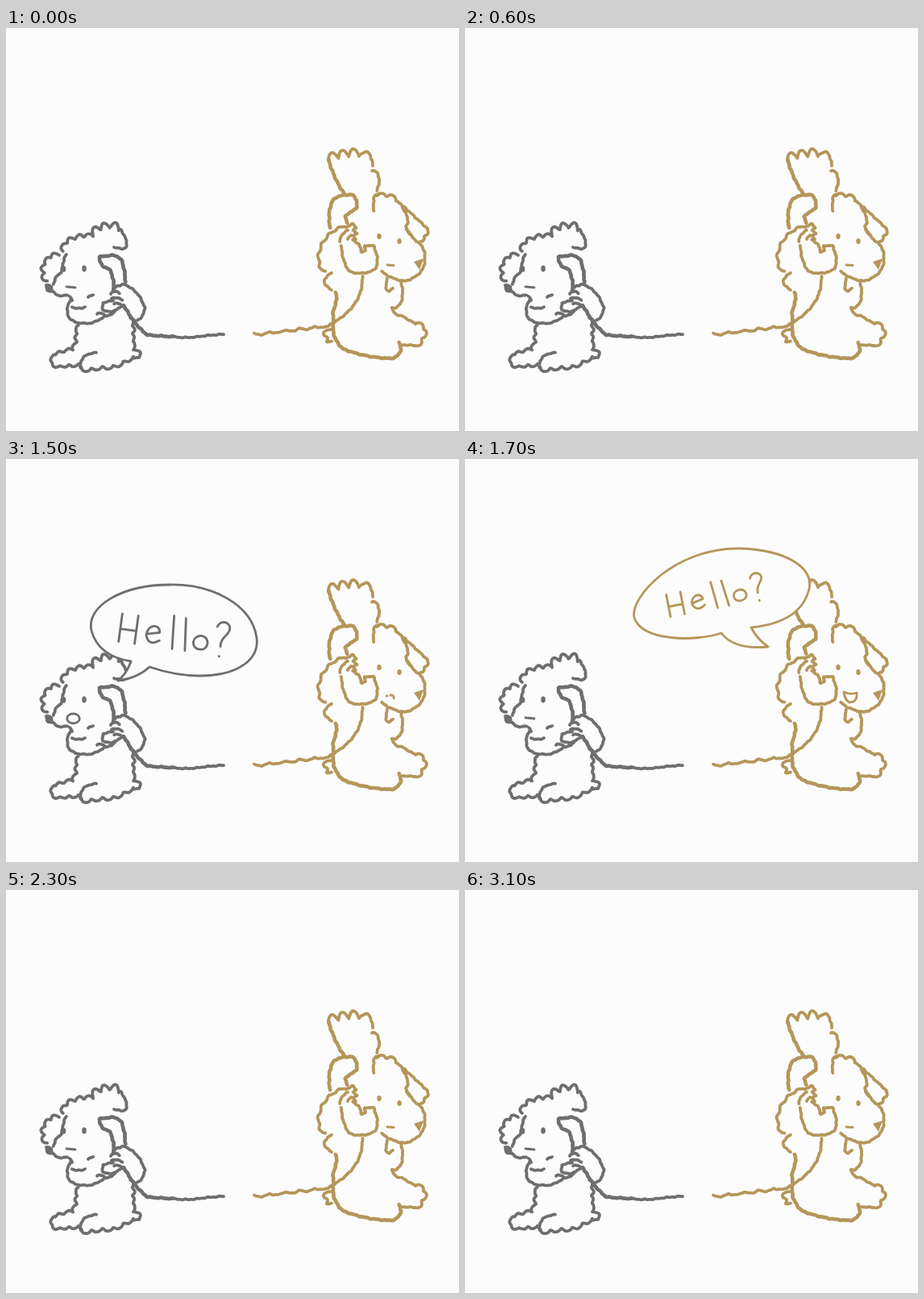
Animation of 562 by 500 pixels, one loop 3.8 s. Source, as an HTML page:

```html
<!DOCTYPE html>
<html lang="en">
<head>
<meta charset="utf-8">
<title>Hello?</title>
<style>
  html, body { margin: 0; width: 100%; height: 100%; overflow: hidden; background: #fcfcfc; }
  svg { display: block; width: 562px; height: 500px; }
  path, ellipse { fill: none; stroke: currentColor; stroke-linecap: round; stroke-linejoin: round; }
  .ink path { stroke-width: 3.8; }
  .ink .bold { stroke-width: 4.6; }
  .bubble path, .mouth, #hello { stroke-width: 2.8; }
  #hello { vector-effect: non-scaling-stroke; }
  .bubble .balloon { fill: #fcfcfc; }
  .solid { fill: currentColor; stroke: none; }
  #gray { color: #6e6e6e; }
  #gold { color: #b5965a; }
</style>
</head>
<body>
<svg viewBox="0 0 562 500">
  <defs>
    <path id="hello" d="M-10-17V18M10-17V18M-10 2H10
      M23 4L39 0C38-12 22-8 23 6Q28 19 40 10
      M54-23L57 18M69-22L73 18
      M91-3C79-2 79 14 91 14S102-3 91-3
      M109-17C112-28 128-24 124-13C122-6 115-4 116 7M116 19V19.5"/>
  </defs>

  <!-- data-bumps adds fur lobes to the left of the drawing direction -->
  <g id="gray">
    <g class="ink">
      <path d="M51 314C44 304 46 284 66 282" data-bumps="4" data-height="4"/>
      <path d="M75 281C68 290 73 302 64 307Q60 311 59 318M58 327Q66 335 76 331M79 333L82 338M102 334L108 331"/>
      <path d="M71 277C72 263 92 259 108 259" data-bumps="4" data-height="4"/>
      <path d="M108 257Q124 245 140 251" data-bumps="3" data-height="8"/>
      <path d="M142 250Q148 257 150 268Q150 277 134 272"/>
      <path class="bold" d="M116 284L130 282Q141 282 144 290Q148 302 148 315M116 284Q117 297 124 297Q133 299 134 324"/>
      <path d="M133 338L120 341V350Q132 355 142 346"/>
      <path d="M133 326Q136 318 141 320Q148 316 152 321Q166 328 172 347Q172 357 163 363M130 330Q136 324 141 329M131 336Q138 332 144 338M134 342Q139 340 144 345"/>
      <path d="M80 337C73 350 74 364 92 366S112 363 121 359M82 346Q90 350 98 346M113 355Q118 352 124 357Q130 358 135 351"/>
      <path d="M82 398C92 392 86 380 90 369" data-bumps="3" data-height="2.5"/>
      <path d="M90 417L62 419Q54 416 60 406L83 399" data-bumps="6" data-height="2.5"/>
      <path d="M158 408C145 412 140 420 125 420S98 426 93 421" data-bumps="5" data-height="3"/>
      <path d="M93 422C90 412 98 403 112 403M158 399Q171 401 165 409H158"/>
      <path d="M154 360C160 372 154 385 159 398" data-bumps="4" data-height="2.5"/>
      <path class="bold" d="M146 344Q162 372 176 381Q190 382 207 383"/>
      <path d="M207 383Q224 385 238 383T270 380"/>
    </g>
    <ellipse class="solid" cx="72" cy="299" rx="2.3" ry="3.7"/>
    <ellipse class="solid" cx="97" cy="298.5" rx="2.8" ry="4"/>
    <path class="solid" d="M48 318Q53 315 58 320L59 328Q51 330 49 325Z"/>
    <path class="mouth closed" d="M75 321L86 322"/>
    <ellipse class="mouth open" cx="83.5" cy="322" rx="7.8" ry="6"/>
    <g class="bubble" role="img" aria-label="Hello?">
      <path class="balloon" d="M155 251Q150 266 139 275Q163 272 178 258C205 267 222 269 240 269C292 269 314 246 311 222C305 180 255 155 203 156C145 156 99 182 106 213C112 235 130 247 155 251Z"/>
      <use href="#hello" transform="translate(152 210) rotate(7.8)"/>
    </g>
  </g>

  <g id="gold">
    <g class="ink">
      <path class="bold" d="M420 206Q408 190 400 163"/>
      <path d="M400 165Q422 158 438 159" data-bumps="3" data-height="9"/>
      <path d="M440 157Q452 146 455 171M454 177C462 176 466 188 460 202M456 227V212Q457 206 462 207"/>
      <path d="M460 208Q476 208 484 213" data-bumps="2" data-height="3"/>
      <path d="M484 214Q491 218 494 227M494 222L523 249M494 227Q502 238 496 246L501 256"/>
      <path d="M523 250L514 265" data-bumps="2" data-height="3"/>
      <path d="M497 250Q505 262 516 270Q523 284 517 299Q510 310 495 314Q478 312 466 302"/>
      <path class="bold" d="M402 248Q398 222 408 211Q418 206 430 207L435 213V224L426 229L421 234L423 242"/>
      <path d="M430 263L438 268L441 278L446 276L445 270H456Q466 294 455 301Q440 307 426 302Q417 290 416 270"/>
      <path d="M422 247L430 243L435 248L430 251L436 255L430 258L434 262M414 265Q416 254 424 251M424 262L428 257"/>
      <path d="M396 302C380 290 392 252 422 247" data-bumps="5" data-height="2"/>
      <path d="M404 304Q386 314 404 325M473 311Q469 324 475 327L480 323M490 314Q496 340 484 347H479"/>
      <path class="bold" d="M409 328Q412 338 406 350V368Q404 385 418 398Q445 409 478 410Q494 406 488 390"/>
      <path d="M479 347Q480 356 491 357L508 367M507 394L492 393M404 374Q392 374 395 382L399 384L398 389H404"/>
      <path d="M508 367Q522 371 518 381T507 394" data-bumps="3" data-height="3"/>
      <path d="M442 308Q444 345 402 368"/>
      <path d="M402 368L308 379" data-bumps="5" data-height="2.5"/>
    </g>
    <ellipse class="solid" cx="463" cy="258.5" rx="2.7" ry="3.5"/>
    <ellipse class="solid" cx="488" cy="264.5" rx="2.7" ry="3.5"/>
    <path class="solid" d="M506 290L518 286L513 300Z"/>
    <path class="mouth closed" d="M473 294L481 294.5"/>
    <path class="mouth hush" d="M472 294H473M477 293Q482 293 481 297"/>
    <path class="mouth open" d="M470 289Q478 293 486 290Q487 302 477 302Q471 299 470 289Z"/>
    <g class="bubble" role="img" aria-label="Hello?">
      <path class="balloon" d="M355 209Q362 223 376 233Q334 237 318 216C285 227 220 226 210 197C204 172 260 110 341 111C400 113 432 135 427 161C420 190 395 205 355 209Z"/>
      <use href="#hello" transform="translate(261 180) rotate(-11) scale(.89 .8)"/>
    </g>
  </g>
</svg>
<script>
// Resamples one stroke with fur lobes and a slight hand wobble.
function sketch(path, d, bumps, height) {
  path.setAttribute('d', d);
  const length = path.getTotalLength();
  const steps = Math.ceil(length / 1.2);
  const points = [];
  for (let i = 0; i <= steps; i++) {
    const s = length * i / steps;
    const p = path.getPointAtLength(s);
    const a = path.getPointAtLength(Math.max(0, s - 1));
    const b = path.getPointAtLength(Math.min(length, s + 1));
    const span = Math.hypot(b.x - a.x, b.y - a.y) || 1;
    const lobe = height * Math.abs(Math.sin(Math.PI * bumps * i / steps));
    const wobble = 0.35 * Math.sin(s * 0.45 + length) + 0.25 * Math.sin(s * 0.9);
    const offset = (lobe + wobble) / span;
    points.push(`${p.x + (b.y - a.y) * offset} ${p.y - (b.x - a.x) * offset}`);
  }
  return 'M' + points.join('L');
}

for (const path of document.querySelectorAll('.ink path')) {
  const { bumps = 0, height = 0 } = path.dataset;
  const strokes = path.getAttribute('d').split(/(?=M)/);
  path.setAttribute('d', strokes.map(d => sketch(path, d, +bumps, +height)).join(''));
}

const LOOP = 3800;
// [start in ms, who is speaking]
const timeline = [
  [0, ''], [200, 'gold'], [500, ''], [1000, 'gold'], [1300, 'gray'],
  [1600, 'gold'], [1900, 'gray'], [2300, ''], [2800, 'gray'], [3100, '']
];

function show(selector, visible) {
  document.querySelector(selector).style.display = visible ? '' : 'none';
}

function draw(now) {
  const time = now % LOOP;
  const speaker = timeline.findLast(([start]) => start <= time)[1];
  for (const dog of ['gray', 'gold']) {
    show(`#${dog} .bubble`, speaker === dog);
    show(`#${dog} .open`, speaker === dog);
  }
  show('#gray .closed', speaker !== 'gray');
  show('#gold .closed', speaker === '');
  show('#gold .hush', speaker === 'gray');
}

const origin = performance.now();
function tick() {
  draw(performance.now() - origin);
  requestAnimationFrame(tick);
}
tick();
</script>
</body>
</html>
```
